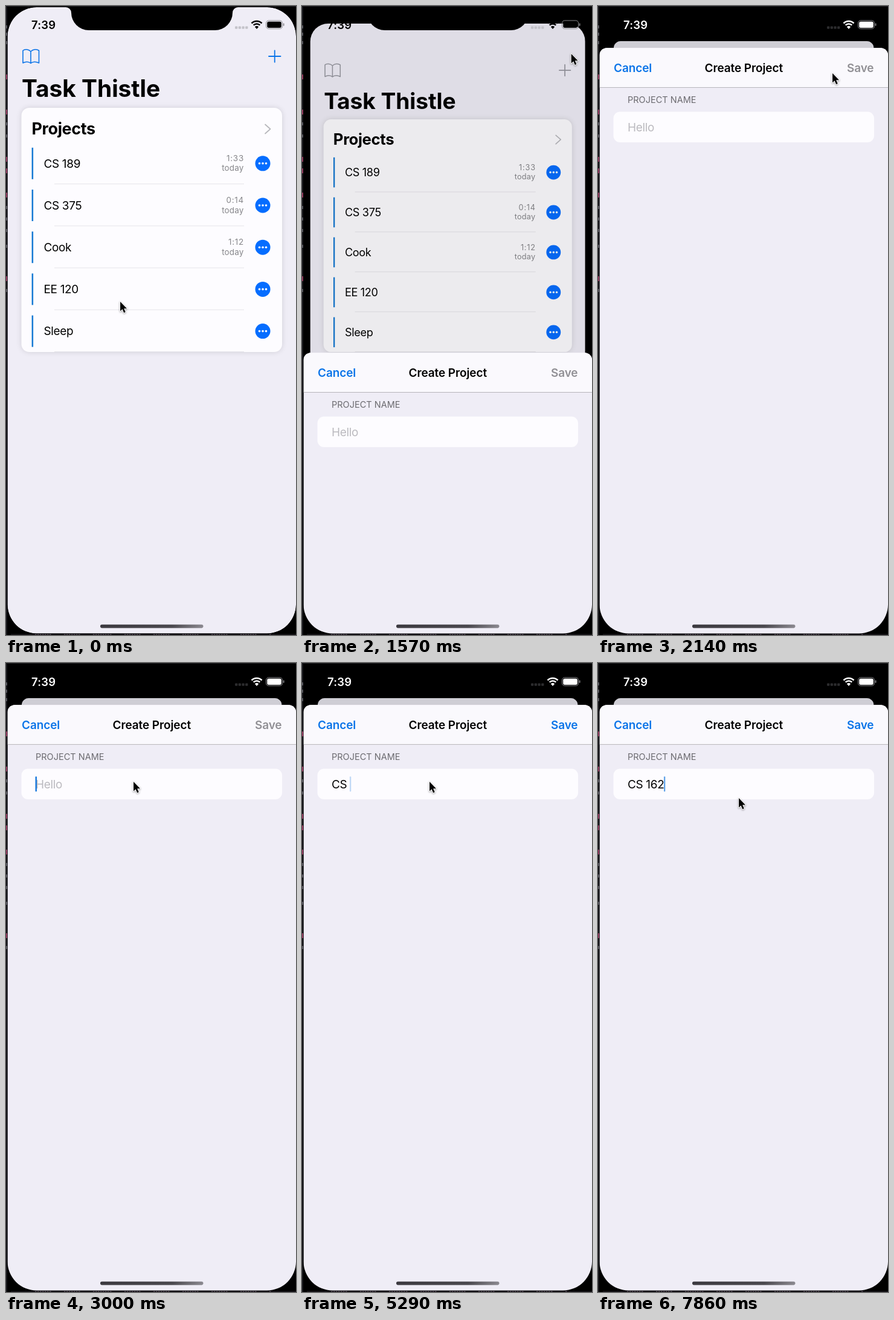
An HTML page with a canvas for the animation above (8 s loop, 480 px wide and 1038 px high).

```html
<!DOCTYPE html>
<html lang="en">
<head>
<meta charset="utf-8">
<title>Create project</title>
<style>
html, body { margin: 0; width: 100%; height: 100%; overflow: hidden; background: #000; }
canvas { display: block; }
</style>
</head>
<body>
<canvas id="stage" width="480" height="1038"></canvas>
<script>
const c = document.getElementById('stage').getContext('2d');
const FPS = 7, LOOP = 8000;
const BLUE = '#0a74e8', PAGE = '#efedf6', PAPER = '#fdfcff', MUTED = '#86868a';

// pointer tip: [step, x, y]
const POINTER = [[0, 188, 487], [1, 192, 480], [2, 226, 420], [3, 288, 312], [4, 360, 200],
  [5, 420, 110], [6, 449, 66], [7, 457, 57], [8, 450, 72], [9, 445, 78], [14, 444, 78],
  [15, 387, 110], [16, 303, 153], [17, 245, 178], [18, 217, 191], [19, 210, 195],
  [54, 210, 195], [55, 232, 222]];
const TYPED = 'CS 162', KEY_STEPS = [27, 29, 33, 46, 51, 52], SLIDE_STEPS = [27, 29, 46];

function text(s, x, y, size, { weight = 400, color = '#000', track = 0, align = 'left' } = {}) {
  c.font = `${weight} ${size}px Inter, sans-serif`;
  c.letterSpacing = track + 'px';
  c.textAlign = align;
  c.fillStyle = color;
  c.fillText(s, x, y);
}

const body = (s, x, y, color) => text(s, x, y, 19, { color, track: -0.35 });
const bold = (s, x, y, color, align) => text(s, x, y, 19, { weight: 600, color, align, track: -0.1 });

function rect(x, y, w, h, color) {
  c.fillStyle = color;
  c.fillRect(x, y, w, h);
}

function round(x, y, w, h, r, color) {
  c.beginPath();
  c.roundRect(x, y, w, h, r);
  c.fillStyle = color;
  c.fill();
}

function dot(x, y, r, color) {
  c.beginPath();
  c.arc(x, y, r, 0, 7);
  c.fillStyle = color;
  c.fill();
}

function line(d, color, width) {
  c.strokeStyle = color;
  c.lineWidth = width;
  c.lineCap = c.lineJoin = 'round';
  c.stroke(new Path2D(d));
}

function desktop() {
  rect(0, 0, 480, 1038, '#000');
  rect(0, 0, 2, 1038, '#17171b');
  rect(2, 0, 478, 1, '#232326');
  for (const y of [113, 171, 249, 268, 308, 446]) rect(0, y, 2, 8, '#8e3a5c');
  for (const y of [32, 44, 58, 192, 212, 330, 349, 368, 394, 467]) rect(0, y, 2, 5, '#55555c');
  rect(8, 1036, 472, 2, '#121014');
  for (let x = 40; x < 440; x += 4) {
    if (Math.sin(x * 1.7) > -0.3) rect(x, 1036.5, 2.5, 1.5, '#4a414d');
  }
}

function row(i, name, spent) {
  const y = 259.8 + 69.2 * i;
  rect(42.6, y - 26, 2.5, 52, '#1679d3');
  body(name, 62.5, y + 6.7);
  if (spent) {
    const small = { color: MUTED, align: 'right' };
    text(spent, 394, y - 3.8, 13.4, { ...small, track: 0.8 });
    text('today', 393.5, y + 12.5, 13.4, { ...small, track: 0.2 });
  }
  dot(425, y, 12.5, '#056dff');
  for (const dx of [-5.5, 0, 5.5]) dot(425 + dx, y, 1.8, '#fff');
  rect(80, y + 33.4, 314, 1, '#e5e4e9');
}

function page(tint, plusAlpha) {
  rect(0, 0, 480, 1038, PAGE);
  line('M41 75C37 71 31 71 28 73.500V94C32 91.500 38 91.500 41 94.500C44 91.500 50 91.500 54.500 94V73.500C51 71 45 71 41 75V94', tint, 1.6);
  c.globalAlpha = plusAlpha;
  line('M435 83H454.500M444.700 73.300V92.700', tint, 1.8);
  c.globalAlpha = 1;
  text('Task Thistle', 26, 150, 39, { weight: 700, track: -0.1 });

  c.shadowColor = 'rgba(0,0,0,.13)';
  c.shadowBlur = 10;
  round(25.5, 168, 431.5, 403, 13, PAPER);
  c.shadowColor = 'transparent';
  text('Projects', 42.5, 212, 27, { weight: 700, track: -0.4 });
  line('M429 195.500L437.500 203L429 210.500', '#b8b8bd', 1.8);
  [['CS 189', '1:33'], ['CS 375', '0:14'], ['Cook', '1:12'], ['EE 120'], ['Sleep']]
    .forEach(([name, spent], i) => row(i, name, spent));
}

function notch() {
  c.fillStyle = '#000';
  c.fill(new Path2D('M99 1V2A9 9 0 0 1 108 11A29 29 0 0 0 137 40H346A29 29 0 0 0 375 11A9 9 0 0 1 384 2V1Z'));
}

function status(p) {
  const v = Math.round(255 * p ** 6.6), ink = `rgb(${v},${v},${v})`;
  text('7:39', 42, 37.6, 18.5, { weight: 600, color: ink, track: 0.2 });
  for (let i = 0; i < 4; i++) round(379 + i * 5.7, 33.5, 4.3, 4.3, 1, p > 0.5 ? '#2c2c2e' : '#c4c3ca');
  c.strokeStyle = ink;
  c.lineCap = 'butt';
  c.lineWidth = 2.6;
  for (const r of [7.5, 12]) {
    c.beginPath();
    c.arc(415, 37, r, -Math.PI * 0.75, -Math.PI * 0.25);
    c.stroke();
  }
  c.beginPath();
  c.moveTo(415, 38);
  c.arc(415, 37.5, 4.4, -Math.PI * 0.75, -Math.PI * 0.25);
  c.fillStyle = ink;
  c.fill();
  c.beginPath();
  c.roundRect(430.5, 24, 27, 13.6, 4.2);
  c.strokeStyle = '#8a8a8e';
  c.lineWidth = 1;
  c.stroke();
  round(432.2, 25.7, 23.6, 10.2, 2.6, ink);
  round(458.8, 28.5, 1.6, 4.6, 1, '#8a8a8e');
}

function caretAlpha(k) {
  if (k < 20) return 0;
  if (k === 20) return 0.5;
  if (k === 55) return 0.65;
  const blinking = k < 26 || (k > 35 && k < 46);
  return blinking ? ({ 2: 0.25, 3: 0, 4: 0.4 }[k % 7] ?? 1) : 1;
}

function sheet(y, k) {
  const count = KEY_STEPS.filter(s => k >= s).length;
  c.save();
  c.translate(0, y);
  round(2.5, 0, 477.5, 1100, [12, 12, 0, 0], PAGE);
  round(2.5, 0, 477.5, 65, [12, 12, 0, 0], '#faf9fd');
  rect(2.5, 64.7, 477.5, 1, '#b6b5ba');
  bold('Cancel', 26, 39.3, BLUE);
  bold('Create Project', 241.3, 39.3, '#000', 'center');
  bold('Save', 456.5, 39.3, count ? BLUE : '#919095', 'right');
  text('PROJECT NAME', 49, 90.3, 14.5, { color: '#6c6b70' });
  round(25.5, 105.3, 431.5, 50.4, 11, PAPER);

  const typed = TYPED.slice(0, count);
  body(typed || 'Hello', 49, 137.5, count ? '#000' : '#bbbabf');
  const end = n => c.measureText(TYPED.slice(0, n)).width;
  const x = SLIDE_STEPS.includes(k) ? (end(count - 1) + end(count)) / 2 : end(count);
  c.globalAlpha = caretAlpha(k);
  round(48.6 + x, 118, 2.3, 25, 1, '#0d72dc');
  c.restore();
}

function homeBar() {
  const g = c.createLinearGradient(156, 0, 326, 0);
  g.addColorStop(0, '#3c3a40');
  g.addColorStop(0.7, '#4b494f');
  g.addColorStop(1, '#8b8990');
  round(156, 1020.8, 170.5, 5.6, 2.8, g);
}

function pointer(k) {
  const i = Math.max(1, POINTER.findIndex(p => p[0] >= k));
  const [k0, x0, y0] = POINTER[i - 1], [k1, x1, y1] = POINTER[i];
  const f = (k - k0) / (k1 - k0);
  c.save();
  c.translate(x0 + (x1 - x0) * f + 0.6, y0 + (y1 - y0) * f + 0.6);
  const arrow = new Path2D('M.5 .5V16L4 12.700L6.600 18.600L9.200 17.500L6.600 11.700H11.500Z');
  c.shadowColor = 'rgba(0,0,0,.4)';
  c.shadowBlur = 3;
  c.shadowOffsetY = 1;
  c.strokeStyle = '#fff';
  c.lineWidth = 2;
  c.lineJoin = 'round';
  c.stroke(arrow);
  c.shadowColor = 'transparent';
  c.fillStyle = '#000';
  c.fill(arrow);
  c.restore();
}

function draw(ms) {
  const k = Math.floor((ms + 5) * FPS / 1000) % (LOOP * FPS / 1000);
  // critically damped rise of the sheet
  const u = Math.max(0, 18.5 * (k / FPS - 1.484));
  const p = 1 - (1 + u) * Math.exp(-u);

  desktop();
  c.save();
  c.beginPath();
  c.roundRect(2.5, 2, 477.5, 1033.5, 48);
  c.clip();
  rect(0, 0, 480, 1038, '#000');

  c.save();
  const scale = 1 - 0.098 * p;
  c.translate(241, 2 + 56 * p);
  c.scale(scale, scale);
  c.translate(-241, -2);
  c.beginPath();
  c.roundRect(2.5, 2, 477.5, 1033.5, 48 - 35 * p);
  c.clip();
  page(p ? '#9797a0' : BLUE, k === 10 ? 0.25 : 1);
  rect(0, 0, 480, 1038, `rgba(0,0,0,${0.135 * p})`);
  c.restore();

  if (p) sheet(1038 - 968.8 * p, k);
  homeBar();
  c.restore();
  notch();
  status(p);
  pointer(k);
}

const start = performance.now();
function tick() {
  draw((performance.now() - start) % LOOP);
  requestAnimationFrame(tick);
}
tick();
</script>
</body>
</html>
```
